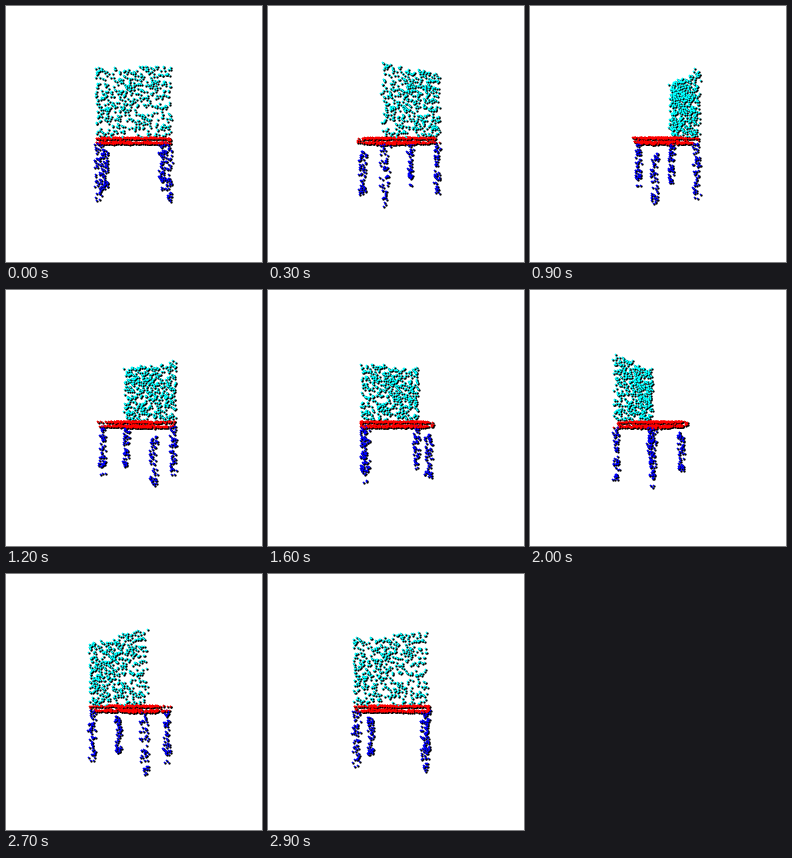
Recreate the animation shown at these times as a matplotlib script. Size 256 by 256 pixels, loop 3000 ms.

```python
import numpy as np
import matplotlib.pyplot as plt
from matplotlib.animation import FuncAnimation

SIZE, DPI = 256, 64
FRAMES, INTERVAL = 30, 100
CAMERA = 207
CENTER = (127.3, 128)
CYAN, RED, BLUE = (0, 1, 1), (1, 0, 0), (0, 0, 1)

rng = np.random.default_rng(11)


def box(n, x, y, z):
    """Random points inside a box; y points down, z towards the viewer at rest."""
    return np.column_stack([rng.uniform(*span, n) for span in (x, y, z)])


def backrest(n):
    return box(n, (-33, 33), (-59, 3), (24.8, 30.2))


def seat(n):
    """Points on the top, bottom and rim of the seat slab."""
    pts = box(n, (-33.3, 33.3), (4, 8.6), (-19.5, 30.5))
    kind = rng.random(n)
    pts[kind < 0.45, 1] = 4
    pts[(kind >= 0.45) & (kind < 0.9), 1] = 8.6
    rim = kind >= 0.9
    side = rng.integers(0, 4, n)
    for k, (axis, value) in enumerate([(0, -33.3), (0, 33.3), (2, -19.5), (2, 30.5)]):
        pts[rim & (side == k), axis] = value
    return pts


def leg(n, x, z):
    pts = box(n, (-3.8, 3.8), (8, 58), (-3.6, 3.6))
    taper = 1 - 0.2 * (pts[:, 1] - 8) / 50
    pts[:, 0] = x + pts[:, 0] * taper
    pts[:, 2] = z + pts[:, 2] * taper
    return pts


parts = [(backrest(540), CYAN), (seat(480), RED)]
parts += [(leg(62, x, z), BLUE) for x in (-30.3, 30.3) for z in (27, -12.5)]
points = np.vstack([p for p, _ in parts])
colors = np.vstack([np.tile(c, (len(p), 1)) for p, c in parts])


def project(angle):
    """Turn the chair about its upright axis and project it onto whole pixels."""
    x, y, z = points.T
    c, s = np.cos(angle), np.sin(angle)
    depth = z * c - x * s
    scale = CAMERA / (CAMERA - depth)
    xy = np.column_stack([(x * c + z * s) * scale, y * scale]) + CENTER
    return np.floor(xy) + 0.5, np.argsort(depth)


def area(diameter):
    return (diameter * 72 / DPI) ** 2


fig = plt.figure(figsize=(SIZE / DPI, SIZE / DPI), dpi=DPI, facecolor="white")
ax = fig.add_axes([0, 0, 1, 1])
ax.set_xlim(0, SIZE)
ax.set_ylim(SIZE, 0)
ax.axis("off")

start = project(0)[0]
shade = ax.scatter(*start.T, s=area(2.3), c="black", linewidths=0, zorder=1)
core = ax.scatter(*start.T, s=area(1.7), c=colors, linewidths=0, zorder=2)


def update(i):
    xy, order = project(2 * np.pi * i / FRAMES)
    shade.set_offsets(xy[order])
    core.set_offsets(xy[order])
    core.set_facecolors(colors[order])
    return shade, core


anim = FuncAnimation(fig, update, frames=FRAMES, interval=INTERVAL,
                     init_func=lambda: update(0), repeat=True, repeat_delay=0)
plt.show()
```
